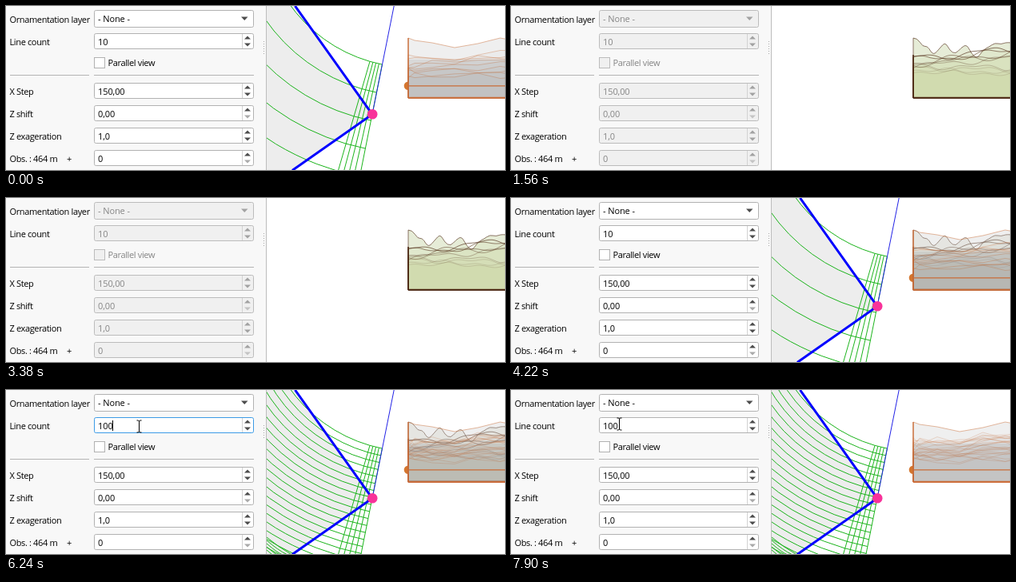
An HTML page for the animation above (7.99 s loop, 624 by 205 pixels).

```html
<!DOCTYPE html>
<html lang="en">
<head>
<meta charset="utf-8">
<title>Profile settings</title>
<style>
html, body { margin: 0; width: 100%; height: 100%; overflow: hidden; background: #fff; }
svg { display: block; width: 624px; height: 205px; }
text { font: 11px "Open Sans", "Noto Sans", sans-serif; letter-spacing: -.36px; fill: #000; white-space: pre; }
.value { letter-spacing: -.1px; }
.field { fill: #fff; stroke: #b2b2b2; }
.split { stroke: #d2d2d2; }
.arrow { fill: #4c4c4c; }
.arrow.end { fill: #aaa; }
.off .field { fill: #f0f0f0; stroke: #bcbcbc; }
.off .ctl { fill: #858585; }
.off .arrow { fill: #a2a2a2; }
.off .arrow.end { fill: #c4c4c4; }
.focus #count { stroke: #3c9be6; }
.green { fill: none; stroke: #1cb41c; }
.coarse path { stroke: #c9733f; fill: #787878; }
.fine { opacity: .8; }
.fine path { stroke: #54301c; fill: #c4c8b0; }
.off .fine { opacity: 1; }
.off .fine path { fill: #9db560; }
</style>
</head>
<body>
<svg id="stage" viewBox="0 0 624 205">
  <g id="map">
    <path d="M326 0H362L458 135L358 205H326Z" fill="#ededed"/>
    <g id="lines10" class="green"></g>
    <g id="lines100" class="green"></g>
    <path id="strip" class="green"/>
    <path d="M361.5 0L458 135.5L358 205.5" fill="none" stroke="#00f" stroke-width="3"/>
    <path d="M485.2 0L458 135.5" stroke="#2222e6"/>
    <circle cx="458.2" cy="135.2" r="6.3" fill="#f8329a"/>
    <path d="M503 94.5a5.3 5.3 0 0 0 0 10.6Z" fill="#d4762f"/>
  </g>
  <g id="fine" class="fine"></g>
  <g id="coarse10" class="coarse"></g>
  <g id="coarse100" class="coarse"></g>
  <path id="frame" d="M503 40V114.5H624M503 99.8H624" fill="none" stroke="#c96c38" stroke-width="1.3"/>
  <rect width="326" height="205" fill="#f8f8f8"/>
  <path d="M325.5 0V205" stroke="#bdbdbd"/>
  <path d="M322.5 44V61" stroke="#a8a8a8" stroke-dasharray="1 2"/>
  <path d="M5 86.5H104M110 86.5H310" stroke="#b4b4b4"/>
  <g id="form"></g>
  <rect id="caret" y="38" width="1" height="13"/>
  <path id="arrow" d="M.5 .5V16.5L4.2 13L6.8 19L9.3 18L6.8 12.2H12Z" fill="#fff" stroke="#000"/>
  <path id="beam" d="M-3 -7.5H-1L0 -6.5L1 -7.5H3M0 -6.5V6.5M-3 7.5H-1L0 6.5L1 7.5H3" fill="none" stroke="#000"/>
</svg>
<script>
const LOOP = 7990;
const $ = id => document.getElementById(id);
const show = (id, on) => { $(id).style.display = on ? '' : 'none'; };

function seeded(seed) {
  return () => (seed = (seed * 16807) % 2147483647) / 2147483647;
}

// Form
const label = (text, y, x = 4.5) => `<text x="${x}" y="${y}">${text}</text>`;
const value = (text, y, id = '') => `<text class="ctl value" ${id} x="115" y="${y}">${text}</text>`;

function spin(name, text, y, atMin, id = '') {
  const boxId = id && `id="${id}"`, textId = id && `id="${id}Text"`;
  return label(name, y + 15) +
    `<rect class="field" ${boxId} x="110.5" y="${y + .5}" width="199" height="19" rx="2"/>` +
    `<path class="split" d="M295.5 ${y + 1}V${y + 19}"/>` +
    `<path class="arrow" d="M298 ${y + 7.5}h8l-4 -4z"/>` +
    `<path class="arrow ${atMin ? 'end' : ''}" d="M298 ${y + 12.5}h8l-4 4z"/>` +
    value(text, y + 14.5, textId);
}

$('form').innerHTML =
  label('Ornamentation layer', 20.5) +
  '<rect class="field" x="110.5" y="5.5" width="199" height="21" rx="2"/>' +
  '<path class="arrow" d="M294 13.5h8.5l-4.25 4.5z"/>' + value('- None -', 20) +
  spin('Line count', '10', 34, false, 'count') +
  '<rect class="field" x="110.5" y="64.5" width="13" height="13"/>' +
  '<text class="ctl" x="127.5" y="75">Parallel view</text>' +
  spin('X Step', '150,00', 96) +
  spin('Z shift', '0,00', 124, true) +
  spin('Z exageration', '1,0', 152) +
  spin('Obs. : 464 m', '0', 180, true) + label('+', 195, 76);

// Map: concentric arcs and a fan of rays around one centre above the stage
const CX = 507, CY = -110, NEAR = 186.7, GAP = 35.7;

function arcs(step) {
  let out = '';
  for (let r = NEAR; r < 400; r += step) {
    out += `<path d="M${CX - r} ${CY}A${r} ${r} 0 0 0 ${CX - r * .196} ${CY + r * .9806}"/>`;
  }
  return out;
}
function ray(slope) {
  const y = CY + NEAR / Math.hypot(1, slope);
  return `M${CX - slope * (y - CY)} ${y}L${CX - slope * (205 - CY)} 205`;
}
let corner = '';
for (let i = 0; i < 5; i++) corner += `<path d="M326 ${184 + i * 4}q14 12 ${30 - i * 5} ${21 - i * 3.5}"/>`;
$('lines10').innerHTML = arcs(GAP);
$('lines100').innerHTML = arcs(GAP / 4) + corner;
$('strip').setAttribute('d', [.2, .223, .245, .267, .29].map(ray).join(''));

// Terrain profiles
const area = (points, alpha, line) =>
  `<path d="M503 115L${points.join('L')}L640 115Z" fill-opacity="${alpha}" stroke-opacity="${line}"/>`;

function coarse(count, alpha, line, seed) {
  const rnd = seeded(seed), xs = [503, 511, 533, 561, 590, 618, 640];
  const top = [40, 43, 46, 52, 47, 40, 44], relief = [4, 2, 1, 5, -6, -9, -6];
  let out = '';
  for (let i = 0; i < count; i++) {
    const depth = i / (count - 1);
    const points = xs.map((x, j) => {
      const y = i ? 60 + depth * 27 + relief[j] * (1 - depth) + (rnd() - .5) * 11 : top[j];
      return `${x} ${y.toFixed(1)}`;
    });
    out += area(points, i ? alpha : .12, i ? line : .5);
  }
  return out + '<rect x="503" y="67" width="121" height="48" fill="#787878" fill-opacity=".14"/>';
}
$('coarse10').innerHTML = coarse(10, .04, .36, 71);
$('coarse100').innerHTML = coarse(24, .015, .24, 433);

function smooth(points) {
  let out = `M${points[0]}`;
  for (let i = 1; i < points.length - 1; i++) {
    const [x, y] = points[i], [u, v] = points[i + 1];
    out += `Q${x} ${y} ${(x + u) / 2} ${(y + v) / 2}`;
  }
  return out;
}
function fine() {
  const rnd = seeded(29);
  const crest = [[503, 40], [508, 40], [515, 51], [521, 50], [528, 62], [536, 53], [543, 45], [549, 56],
    [556, 60], [563, 52], [570, 48], [576, 60], [583, 66], [590, 55], [598, 51], [605, 46], [613, 48], [620, 45], [640, 48]];
  let out = `<path d="${smooth(crest)}V115H503Z" fill-opacity=".25" stroke-opacity=".65"/>`;
  for (let i = 0; i < 9; i++) {
    const a = rnd() * 6.3, b = rnd() * 6.3, points = [];
    const amp = 4 - i * .3, tilt = i < 5 ? -.09 : .02;
    for (let x = 503; x <= 627; x += 3) {
      const y = 63 + i * 2.5 + tilt * (x - 530) + amp * Math.sin(x / 14 + a) + 1.6 * Math.sin(x / 6.5 + b);
      points.push(`${x} ${y.toFixed(1)}`);
    }
    out += area(points, .045, Math.max(.15, .65 - i * .08));
  }
  return out + '<path d="M503 61V114.5H624" style="fill:none;stroke:#4a2410" stroke-width="1.5"/>';
}
$('fine').innerHTML = fine();

// Pointer steps: time, shape, x, y
const pointer = [
  [0], [1740, 'arrow', 487, 22], [1830, 'arrow', 520, 36], [1920, 'arrow', 560, 54], [2010, 'arrow', 592, 67],
  [2100, 'arrow', 586, 70], [2190, 'arrow', 573, 72], [2280, 'arrow', 565, 72], [2460, 'arrow', 564, 72],
  [3200, 'arrow', 500, 50], [3290, 'arrow', 386, 16], [3380],
  [4590, 'arrow', 217, 2], [4680, 'arrow', 198, 17], [4770, 'beam', 174.5, 41.5], [4860, 'beam', 166.5, 45.5],
  [6700, 'beam', 157.5, 34.5], [6790], [7900, 'beam', 135.5, 42.5]
];

function draw(t) {
  const within = (a, b) => t >= a && t < b;
  const busy = within(1560, 4220), typed = t >= 6150;
  const dense = t >= 6240, ready = within(450, 7620);
  const root = $('stage').classList;
  root.toggle('off', busy);
  root.toggle('focus', within(5040, 7530));
  $('countText').textContent = typed ? '100' : '10';

  show('map', !busy);
  show('frame', !busy);
  show('lines10', !dense);
  show('lines100', dense);
  show('coarse10', !busy && !dense);
  show('coarse100', !busy && dense);
  show('fine', ready);

  show('caret', within(5130, 5590) || within(6150, 6700) || within(7350, 7530));
  $('caret').setAttribute('x', typed ? 133 : 127);

  const [, shape, x, y] = pointer.filter(p => p[0] <= t).pop();
  for (const id of ['arrow', 'beam']) {
    show(id, id === shape);
    if (id === shape) $(id).setAttribute('transform', `translate(${x} ${y})`);
  }
}

const start = performance.now();
function tick() {
  draw((performance.now() - start) % LOOP);
  requestAnimationFrame(tick);
}
tick();
</script>
</body>
</html>
```
